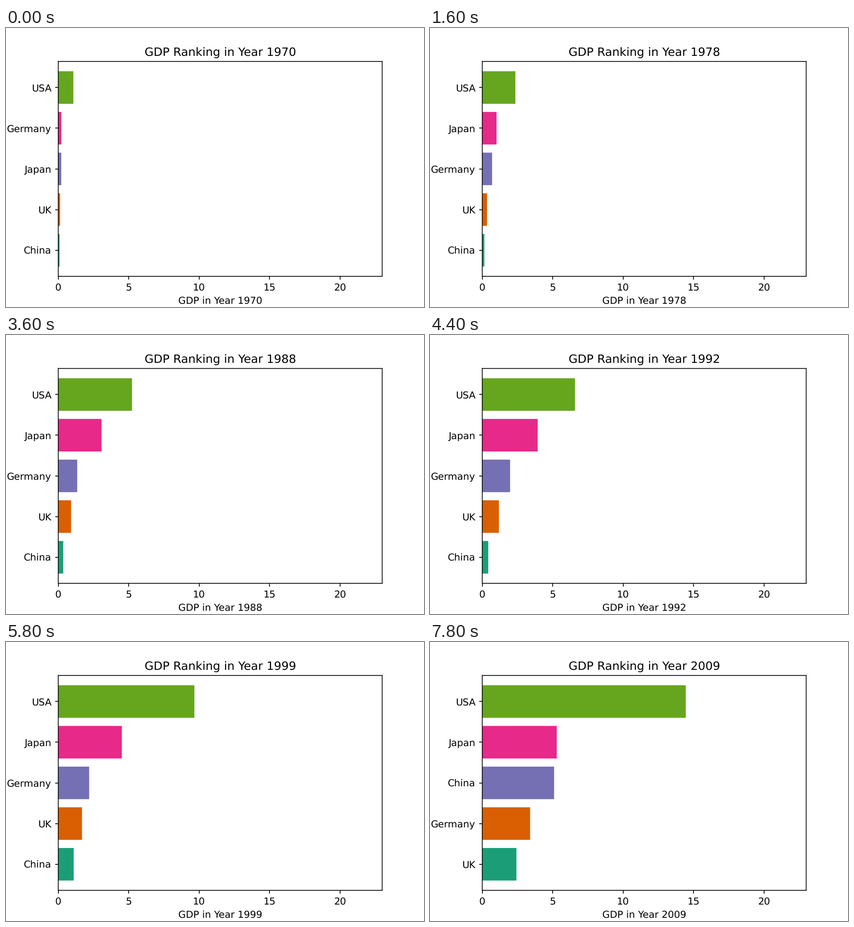
A matplotlib script that plays this animation: 917x611 px, repeating every 8000 ms.

```python
import numpy as np
import matplotlib.pyplot as plt
from matplotlib.animation import FuncAnimation

DPI = 917 / 6
START, YEARS, STEP_MS = 1970, 40, 200
COLORS = plt.get_cmap("Dark2").colors[:5]

# Turning points of GDP, in trillions of US dollars, by years since START
TURNS = {
    "USA": {0: 1.073, 8: 2.352, 11: 3.207, 14: 4.038, 20: 5.963, 25: 7.640,
            30: 10.25, 33: 11.46, 35: 13.04, 37: 14.45, 38: 14.71, 39: 14.45},
    "Japan": {0: 0.213, 1: 0.240, 3: 0.432, 6: 0.586, 8: 1.014, 15: 1.399,
              16: 2.079, 18: 3.072, 20: 3.133, 25: 5.546, 28: 4.098, 30: 4.968,
              32: 4.183, 34: 4.893, 37: 4.580, 39: 5.290},
    "Germany": {0: 0.216, 2: 0.300, 7: 0.601, 10: 0.950, 11: 0.801, 15: 0.733,
                17: 1.298, 19: 1.399, 20: 1.772, 24: 2.205, 25: 2.586, 27: 2.212,
                29: 2.195, 30: 1.944, 32: 2.069, 34: 2.809, 36: 2.992, 38: 3.730,
                39: 3.398},
    "UK": {0: 0.131, 7: 0.263, 10: 0.565, 14: 0.462, 18: 0.910, 22: 1.180,
           23: 1.061, 25: 1.344, 29: 1.687, 31: 1.650, 34: 2.423, 36: 2.714,
           37: 3.107, 39: 2.426},
    "China": {0: 0.093, 5: 0.163, 8: 0.150, 15: 0.310, 23: 0.445, 25: 0.735,
              30: 1.211, 33: 1.660, 35: 2.286, 37: 3.550, 38: 4.594, 39: 5.102},
}


def growth(turns):
    """Yearly values with a constant growth rate between turning points."""
    years, values = list(turns), list(turns.values())
    return np.exp(np.interp(np.arange(YEARS), years, np.log(values)))


gdp = {name: growth(turns) for name, turns in TURNS.items()}

plt.rcParams.update({
    "font.family": "DejaVu Sans",
    "text.hinting": "no_hinting",
    "path.snap": False,
})
fig, ax = plt.subplots(figsize=(917.01 / DPI, 611.01 / DPI), dpi=DPI)
bars = ax.barh(range(5), [1] * 5, color=COLORS)
ax.set_xlim(0, 23)
ax.set_ylim(-0.64, 4.64)
ax.set_yticks(range(5))


def draw(i):
    ranking = sorted(gdp, key=lambda name: gdp[name][i])
    for bar, name in zip(bars, ranking):
        bar.set_width(gdp[name][i])
    ax.set_yticklabels(ranking)
    ax.set_title(f"GDP Ranking in Year {START + i}")
    ax.set_xlabel(f"GDP in Year {START + i}", labelpad=4.4)
    return list(bars)


anim = FuncAnimation(fig, draw, frames=YEARS, interval=STEP_MS,
                     init_func=lambda: draw(0), repeat=True, repeat_delay=0)
plt.show()
```
